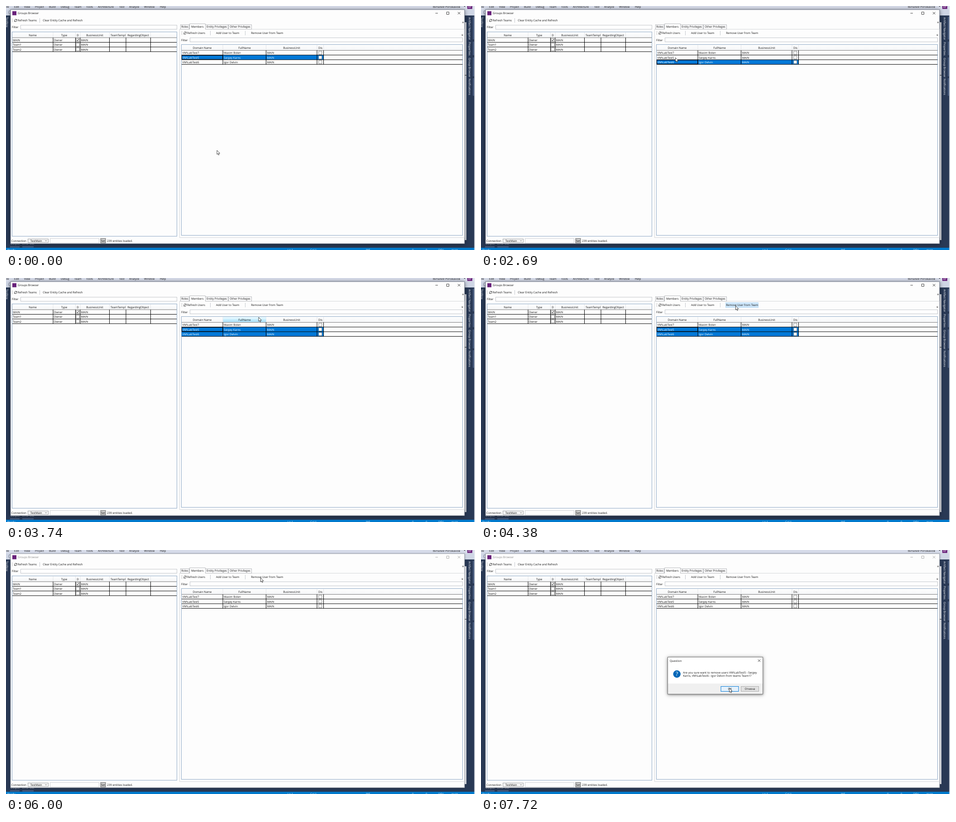
An HTML page that plays this animation: 1036 by 541 pixels, repeating every 8 s.

```html
<!DOCTYPE html>
<html lang="en">
<head>
<meta charset="utf-8">
<title>Team members</title>
<style>
html, body { margin: 0; width: 100%; height: 100%; overflow: hidden; background: #293955; }
svg { display: block; width: 1036px; height: 541px; }
text { font: 6.18px "Open Sans", "Noto Sans", sans-serif; text-rendering: geometricPrecision; white-space: pre; }
</style>
</head>
<body>
<svg id="stage" viewBox="0 0 1036 541" xmlns="http://www.w3.org/2000/svg">
  <defs>
    <linearGradient id="hot" x2="0" y2="1">
      <stop offset="0" stop-color="#e8f8ff"/><stop offset=".45" stop-color="#d8f3fe"/>
      <stop offset=".5" stop-color="#bdeafd"/><stop offset="1" stop-color="#b3e3fa"/>
    </linearGradient>
    <linearGradient id="head" x2="0" y2="1">
      <stop offset="0" stop-color="#fefefe"/><stop offset="1" stop-color="#f5f6f8"/>
    </linearGradient>
  </defs>
</svg>
<script>
const stage = document.getElementById('stage');
let layer = stage;

function add(tag, attrs, parent = layer) {
  const el = document.createElementNS(stage.namespaceURI, tag);
  for (const k in attrs) el.setAttribute(k, attrs[k]);
  return parent.appendChild(el);
}
const rect = (x, y, w, h, fill, stroke = 'none') =>
  add('rect', { x, y, width: w, height: h, fill, stroke });
const line = (x1, y1, x2, y2, stroke = '#000', width = 1) =>
  add('path', { d: `M${x1} ${y1}L${x2} ${y2}`, stroke, 'stroke-width': width, fill: 'none' });
const path = (d, stroke, width = 1, fill = 'none') =>
  add('path', { d, stroke, 'stroke-width': width, fill });
// y is the middle of the capitals
function text(x, y, str, fill = '#111', more = {}) {
  const el = add('text', { x, y: y + 2.2, fill, ...more });
  el.textContent = str;
  return el;
}
const mid = (x, y, str, fill) => text(x, y, str, fill, { 'text-anchor': 'middle' });
const upright = (x, y, str) =>
  text(0, 0, str, '#fff', { transform: `translate(${x} ${y}) rotate(90)` });
const group = () => (layer = add('g', {}, stage));

function refresh(x, y) {
  path(`M${x - 2.6} ${y - .5}A2.7 2.7 0 0 1 ${x + 2} ${y - 1.8}M${x + 2.6} ${y + .5}A2.7 2.7 0 0 1 ${x - 2} ${y + 1.8}`, '#222', .9);
  path(`M${x + 3} ${y - 3.2}v2.6h-2.6zM${x - 3} ${y + 3.2}v-2.6h2.6z`, 'none', 0, '#222');
}
function grip(x, y) {
  for (let i = 0; i < 4; i++) rect(x, y + i * 2.2, 1, 1, '#888');
}
function overflow(x, y) {
  path(`M${x - 1.5} ${y - 1}h3M${x - 1.5} ${y + .5}l1.5 1.5l1.5 -1.5z`, '#555', .6, '#555');
}
function checkbox(x, y, on) {
  rect(x - 3.5, y - 3.5, 7, 7, '#fff', '#707070').setAttribute('stroke-width', .8);
  if (on) path(`M${x - 2.2} ${y}l1.6 1.9l3 -4`, '#111', 1);
}
function gridFrame(x, y, w, h, cols) {
  rect(x, y, w, h, '#fdfdfd', '#8ea9c6');
  rect(x + .5, y + .5, w - 1, 12, 'url(#head)');
  cols.forEach(c => line(c, y + 1, c, y + 12, '#e2e4e8'));
}
const rowStep = 10.35;
function gridLines(x, right, top, cols) {
  line(x, top, right, top, '#777');
  for (let i = 1; i < 4; i++) line(x, top + i * rowStep, right, top + i * rowStep);
  cols.forEach(c => line(c, top, c, top + 3 * rowStep));
}

// Editor behind the window
rect(0, 0, 1036, 541, '#293955');
rect(0, 0, 1036, 8, '#d6dbe9');
rect(0, 8, 10, 13, '#cfd6e5');
rect(1013, 8, 23, 13, '#cfd6e5');
add('circle', { cx: 9, cy: 14, r: 3.6, fill: 'none', stroke: '#8b93a5' });
[['File', -3], ['Edit', 18], ['View', 40], ['Project', 64], ['Build', 95], ['Debug', 121], ['Team', 151],
 ['Tools', 177], ['Architecture', 203], ['Test', 250], ['Analyze', 272], ['Window', 305], ['Help', 340]]
  .forEach(([s, x]) => text(x, 1.3, s, '#1b1b1b'));
text(943, 1.6, 'Виталий Рогожанов', '#1b1b1b');
path('M1011.5 0h3l-1.5 2z', 'none', 0, '#333');
rect(1019, 0, 11, 6.5, '#68217a');
mid(1024.5, 1.6, 'ВР', '#fff');
upright(2, 24.5, 'Toolbox');
rect(1013, 36, 4, 483, '#e3e5ea');
line(1013, 153.5, 1017, 153.5, '#222');
[['Artifact Navigator', 25, 49], ['Properties', 80, 29], ['Group Browser', 115, 41], ['Notifications', 161, 38]]
  .forEach(([s, y, h]) => {
    rect(1031, y - 1, 3, h + 1, '#465a7d');
    upright(1024.5, y, s);
  });
text(10, 526.5, 'Output', '#dfe4ee');
text(36, 526.5, 'Error List', '#dfe4ee');
rect(9, 532.5, 21, 3, '#465a7d');
rect(36, 532.5, 25, 3, '#465a7d');
rect(0, 536, 1036, 5, '#007acc');
[['Ready', 3], ['Ln 1', 622], ['Col 1', 672], ['INS', 795], ['0', 897], ['0', 927], ['DEV', 955], ['main', 984]]
  .forEach(([s, x]) => text(x, 540.6, s, '#e6f2fa'));
rect(1034.5, 0, 1.5, 541, '#eef0f4');

// Main window
const shade = rect(10, 8, 1003, 519, '#fff');
const frame = rect(10, 8, 1003, 519, '#fdfdfd');
rect(14, 11.5, 9, 9, '#68217a');
const title = text(26, 16, 'Groups Browser');
const caption = path('M948.5 16h5.5M973.3 13.3h5.2v5.2h-5.2zM998 13.2l5.4 5.4M1003.4 13.2l-5.4 5.4', '#111', .8);

grip(13.5, 28);
refresh(21.3, 32);
text(25.8, 32, 'Refresh Teams');
line(74.5, 27, 74.5, 37, '#c5c8ce');
text(81.3, 32, 'Clear Entity Cache and Refresh');
overflow(1009.5, 36);
text(13, 47.2, 'Filter');
rect(32.5, 42.5, 345, 9, '#fff', '#c2c5ca');

const leftCols = [104, 153.5, 164, 228.5, 265, 319.5];
gridFrame(13.5, 57.5, 364, 453, leftCols);
[['Name', 59], ['Type', 128.5], ['D', 158.5], ['BusinessUnit', 196], ['RegardingObject', 292]]
  .forEach(([s, x]) => mid(x, 64.8, s));
text(231, 64.8, 'TeamTempl');
['MAIN', 'Team1', 'Team2'].forEach((name, i) => {
  const y = 75.7 + i * rowStep;
  text(15, y, name);
  text(105.5, y, 'Owner');
  checkbox(158.5, y - .3, !i);
  text(165.5, y, 'MAIN');
});
gridLines(14, 377, 70.2, leftCols);

// Tabs
rect(383.5, 51.5, 629, 462, '#fdfdfd', '#d4d6da');
[['Roles', 385.5, 19], ['Entity Privileges', 440.5, 50], ['Other Privileges', 491.5, 51]]
  .forEach(([s, x, w]) => {
    rect(x, 41.5, w, 10, '#fbfbfc', '#b8babd');
    mid(x + w / 2, 46.2, s);
  });
path('M405.5 52V39.5H440.5V52', '#b8babd', 1, '#fdfdfd');
mid(422.7, 45.6, 'Members');

grip(388, 56);
refresh(395.5, 60);
text(400, 60, 'Refresh Users');
line(451.5, 55, 451.5, 65, '#c5c8ce');
text(464, 60, 'Add User to Team');
line(528.5, 55, 528.5, 65, '#c5c8ce');
const removeBtn = rect(540.5, 54.5, 72, 11, '#cde6fa', '#bbdcf6');
text(541.3, 60, 'Remove User from Team');
overflow(1008, 64);
text(387, 75.5, 'Filter');
const filterBox = rect(406.5, 70.5, 602, 9, '#fff', '#c2c5ca');

const rightCols = [479, 574.5, 687, 701.5];
gridFrame(387.5, 85.5, 621, 423, rightCols);
const hotHead = rect(479.5, 86, 95, 12, 'url(#hot)');
[['Domain Name', 433.5], ['FullName', 527], ['BusinessUnit', 631], ['Dis', 694.5]]
  .forEach(([s, x]) => mid(x, 93, s));
const rowTop = 98.4;
const rows = [['VM\\LabTest7', 'Maxim Bolen'], ['VM\\LabTest5', 'Sergey Karns'], ['VM\\LabTest6', 'Igor Delvin']]
  .map(([login, name], i) => {
    const top = rowTop + i * rowStep, y = top + 5.6;
    const back = rect(388, top, 313.5, rowStep, '#0078d7');
    const cells = [text(389.5, y, login), text(481, y, name), text(576.5, y, 'MAIN')];
    checkbox(694.3, y - .3);
    const focus = rect(388.5, top + .8, 90, rowStep - 1.6, 'none', '#000');
    return { back, cells, focus };
  });
gridLines(388, 1008.5, rowTop, rightCols);

// Bottom bar
text(12, 520.7, 'Connection');
rect(48.5, 516.5, 45, 8, '#f6f6f6', '#a4a6aa');
text(53.7, 520.7, 'TestMain');
path('M86.5 519.5l1.8 1.8l1.8 -1.8', '#444', .8);
rect(97.5, 515.5, 108, 10, '#fdfdfd', '#d0d2d6');
rect(209, 515.5, 11, 10, '#cfcfcf', '#666');
mid(214.5, 520.7, 'Set');
text(223.3, 520.7, '239 entities loaded.');

// Question box
const dialog = group();
rect(412.5, 237.5, 210, 82, '#fff', '#777').style.filter = 'drop-shadow(0 1.5px 2px #0004) drop-shadow(0 1px 4px #0005)';
text(417, 245.7, 'Question');
path('M611.8 242.6l5.4 5.4M617.2 242.6l-5.4 5.4', '#111', .8);
add('circle', { cx: 432.7, cy: 275, r: 8.2, fill: '#0067b8' });
add('text', { x: 432.7, y: 279.4, fill: '#fff', 'text-anchor': 'middle', style: 'font-size:12.5px' }).textContent = '?';
text(446.3, 271.9, 'Are you sure want to remove users VM\\LabTest5 - Sergey');
text(446.3, 279.1, 'Karns, VM\\LabTest6 - Igor Delvin from teams Team1?');
rect(413, 296, 209, 23, '#f0f0f0');
const okBtn = rect(530, 302.5, 39, 11, '#e1e1e1', '#0078d7');
mid(549.7, 308.2, 'OK');
rect(574.5, 302.5, 39, 11, '#e1e1e1', '#adadad');
mid(594, 308.2, 'Отмена');

const cursor = group();
path('M0 0V9L2 7.2L3.4 10.4L4.9 9.8L3.6 6.6H6.4Z', '#111', .75, '#fff').setAttribute('stroke-linejoin', 'round');

// start, end, number of steps, points passed
const moves = [
  [1370, 1910, 8, [[466, 320], [480, 255], [470, 175], [450, 135], [430, 111]]],
  [2120, 2480, 5, [[430, 111], [431, 117], [430, 121]]],
  [2600, 2690, 2, [[430, 121], [429.5, 114.5]]],
  [3050, 3740, 12, [[429.5, 114.5], [450, 150], [490, 160], [535, 130], [558, 87]]],
  [3830, 3830, 1, [[558, 87], [560, 70]]],
  [3890, 4100, 4, [[560, 70], [561, 65.5]]],
  [4320, 4380, 2, [[561, 65.5], [562.5, 61.7]]],
  [6480, 7170, 11, [[562.5, 61.7], [550, 110], [530, 170], [521, 235], [532, 290], [548.5, 309]]],
  [7600, 7720, 3, [[548.5, 309], [548.5, 306.3]]]
];

function along(pts, p) {
  const s = p * (pts.length - 1), i = Math.min(Math.floor(s), pts.length - 2), u = s - i;
  const at = k => pts[Math.max(0, Math.min(pts.length - 1, k))];
  const [a, b, c, d] = [i - 1, i, i + 1, i + 2].map(at);
  return [0, 1].map(j => b[j] + .5 * u * (c[j] - a[j]
    + u * (2 * a[j] - 5 * b[j] + 4 * c[j] - d[j] + u * (3 * (b[j] - c[j]) + d[j] - a[j]))));
}
function pointer(t) {
  let pos = moves[0][3][0];
  for (const [t0, t1, n, pts] of moves) {
    if (t < t0) break;
    const k = t >= t1 ? n : 1 + Math.floor((t - t0) / (t1 - t0) * (n - 1));
    const p = k / n;
    pos = along(pts, .6 * p + .4 * p * p * (3 - 2 * p));
  }
  return pos;
}
const show = (el, on) => el.setAttribute('visibility', on ? 'visible' : 'hidden');
const within = (t, a, b) => t >= a && t < b;

function draw(t) {
  const [x, y] = pointer(t);
  cursor.setAttribute('transform', `translate(${x} ${y})`);

  const both = within(t, 2810, 5930);
  const selected = [false, t < 2540 || both, within(t, 2540, 5930)];
  const focused = within(t, 2540, 2810) ? 2 : 1;
  rows.forEach((r, i) => {
    show(r.back, selected[i]);
    show(r.focus, selected[i] && focused === i);
    r.cells.forEach(c => c.setAttribute('fill', selected[i] ? '#fff' : '#111'));
  });

  show(hotHead, within(t, 3050, 3830) && y > 86 && y < 98 && x > 479 && x < 575);
  filterBox.setAttribute('stroke', within(t, 3830, 4000) && y > 68 ? '#7eb4ea' : '#c2c5ca');
  show(removeBtn, within(t, 4320, 5930));
  removeBtn.setAttribute('fill', t >= 5850 ? '#a9d3f5' : '#cde6fa');

  const active = t < 6000;
  title.setAttribute('fill', active ? '#111' : '#8a8a8a');
  caption.setAttribute('stroke', active ? '#111' : '#999');
  frame.setAttribute('stroke', active ? '#6f7788' : '#9298a4');
  shade.style.filter = `drop-shadow(0 1px ${active ? '4px #0008' : '2px #0005'})`;

  show(dialog, t >= 6060);
  const p = Math.min(1, (1 + Math.floor((t - 6060) / 70)) / 4);
  const scale = .92 + .08 * p;
  dialog.setAttribute('opacity', p);
  dialog.setAttribute('transform', `translate(517.5 278.5) scale(${scale}) translate(-517.5 -278.5)`);

  const hover = t > 6480 && y > 302 && x > 530;
  okBtn.setAttribute('fill', hover ? '#e5f1fb' : '#e1e1e1');
  okBtn.setAttribute('stroke-width', hover ? 1 : 1.5);
}

const start = performance.now();
function tick() {
  draw((performance.now() - start) % 8000);
  requestAnimationFrame(tick);
}
tick();
</script>
</body>
</html>
```
